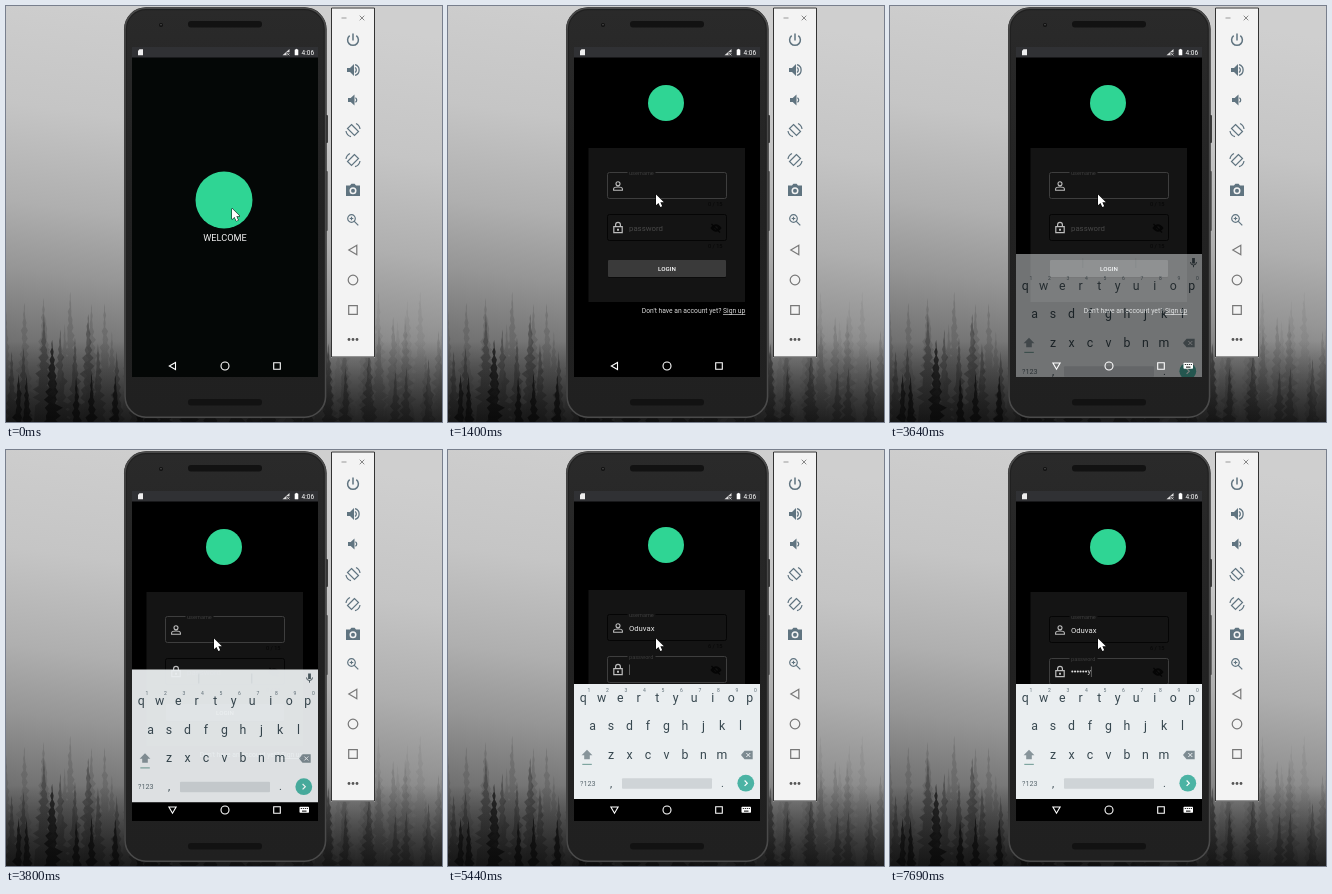
An HTML page with a canvas that plays this animation: 436 by 416 pixels, repeating every 8 s.

```html
<!DOCTYPE html>
<html lang="en">
<head>
<meta charset="utf-8">
<title>Login screen demo</title>
<style>
  html, body { margin: 0; width: 100%; height: 100%; overflow: hidden; background: #888; }
  canvas { display: block; width: 436px; height: 416px; }
</style>
</head>
<body>
<canvas id="stage"></canvas>
<script>
const W = 436, H = 416, LOOP = 8000, STEP = 77;
const dpr = window.devicePixelRatio || 1;
function prepare(canvas) {
  canvas.width = W * dpr;
  canvas.height = H * dpr;
  return canvas.getContext('2d');
}
const layer = prepare(document.createElement('canvas'));
let ctx = prepare(document.getElementById('stage'));

const USERNAME = 'Oduvax', PASSWORD = 'meadowy';
const userKeys = [4040, 4430, 4580, 4750, 4900, 5050];
const passKeys = [6440, 6610, 7080, 7150, 7320, 7460, 7690];
const caretBlinks = [1300, 1780, 2250, 2800, 3260, 4040, 5740, 6300];
const LOGIN_AT = 770, TAP_AT = 3410, KEYBOARD_AT = 3580, PASSWORD_AT = 5280;

// Drawing helpers
function box(x, y, w, h, fill, r = 0) {
  ctx.fillStyle = fill;
  ctx.beginPath();
  ctx.roundRect(x, y, w, h, r);
  ctx.fill();
}
function frame(x, y, w, h, color, width = 1, r = 0) {
  ctx.strokeStyle = color;
  ctx.lineWidth = width;
  ctx.beginPath();
  ctx.roundRect(x, y, w, h, r);
  ctx.stroke();
}
function disc(x, y, r, fill) {
  ctx.fillStyle = fill;
  ctx.beginPath();
  ctx.arc(x, y, r, 0, 7);
  ctx.fill();
}
function label(s, x, y, size, fill, align = 'left', weight = 400) {
  ctx.font = `${weight} ${size}px Roboto, sans-serif`;
  ctx.textAlign = align;
  ctx.fillStyle = fill;
  ctx.fillText(s, x, y);
}
function icon(x, y, color, outline, solid = '', width = 1.3) {
  ctx.save();
  ctx.translate(x, y);
  ctx.strokeStyle = ctx.fillStyle = color;
  ctx.lineWidth = width;
  if (outline) ctx.stroke(new Path2D(outline));
  if (solid) ctx.fill(new Path2D(solid), 'evenodd');
  ctx.restore();
}
function gradient(x0, y0, x1, y1, stops) {
  const g = ctx.createLinearGradient(x0, y0, x1, y1);
  stops.forEach(([at, color]) => g.addColorStop(at, color));
  return g;
}
const circlePath = r => `M${-r} 0a${r} ${r} 0 1 0 ${2 * r} 0a${r} ${r} 0 1 0 ${-2 * r} 0z`;

// Paints onto a separate layer, shifted down by dy, then fades it in as a whole
function group(alpha, dy, paint) {
  const outer = ctx;
  ctx = layer;
  ctx.setTransform(dpr, 0, 0, dpr, 0, 0);
  ctx.clearRect(0, 0, W, H);
  ctx.translate(0, dy);
  paint();
  ctx = outer;
  ctx.globalAlpha = alpha;
  ctx.drawImage(layer.canvas, 0, 0, W, H);
  ctx.globalAlpha = 1;
}

// Timing helpers
const clamp = v => Math.max(0, Math.min(1, v));
const snap = (t, anchor) => anchor + Math.floor((t - anchor) / STEP) * STEP;
const countUntil = (times, t) => times.filter(at => at <= t).length;

// Misty forest, thinning out into fog towards the right
let seed = 11;
function random() {
  seed = (seed * 16807) % 2147483647;
  return seed / 2147483647;
}
function treeLayer(count, top, spread, halfWidth) {
  const path = new Path2D();
  for (let i = 0; i < count; i++) {
    const x = (i + random()) * W / count, y = top + random() * spread;
    const right = [], left = [];
    for (let k = 0; k < 24; k++) {
      const w = halfWidth * (k / 24) * (k % 2 ? 1 : 0.5);
      right.push([x + w * (0.6 + random() * 0.8), y + k * 4]);
      left.unshift([x - w * (0.6 + random() * 0.8), y + k * 4]);
    }
    [...right, [x + halfWidth, H], [x - halfWidth, H], ...left]
      .forEach(([px, py], n) => n ? path.lineTo(px, py) : path.moveTo(px, py));
    path.closePath();
  }
  return path;
}
const forest = [
  [treeLayer(34, 285, 45, 9), 70, .28],
  [treeLayer(30, 305, 45, 10), 45, .45],
  [treeLayer(22, 322, 50, 11), 18, .75]
];
function backdrop() {
  box(0, 0, W, H, gradient(60, -20, 0, H, [
    [0, '#cfcfcf'], [.28, '#c5c5c5'], [.5, '#afafaf'], [.65, '#969696'],
    [.8, '#747474'], [1, '#4c4c4c']
  ]));
  forest.forEach(([path, tone, alpha]) => {
    const mist = a => `rgba(${tone},${tone},${tone},${a})`;
    ctx.fillStyle = gradient(90, 0, 390, 0, [[0, mist(alpha)], [1, mist(alpha * .35)]]);
    ctx.fill(path);
  });
  box(0, 335, W, 81, gradient(0, 335, 0, H, [[0, 'rgba(0,0,0,0)'], [1, 'rgba(0,0,0,.65)']]));
}

function phone() {
  box(319, 109, 3, 28, '#3a3a3a', 1);
  box(319, 165, 3, 60, '#666', 1);
  box(118, 1.2, 202.6, 411, '#202020', 22);
  frame(119, 2.2, 200.6, 409, '#4a4a4a', 1.6, 21);
  box(121, 4.2, 196.6, 405, gradient(0, 5, 0, 409, [[0, '#2a2a2a'], [.5, '#222222'], [1, '#202020']]), 19);
  box(182, 15, 74, 6.5, '#121212', 3);
  box(182, 393, 74, 6.5, '#121212', 3);
  disc(155, 19, 2, '#111');
  disc(155, 18.7, .8, '#555');
}

function sidebar() {
  box(325, 1.5, 44, 350, '#f3f3f3');
  frame(325.5, 2, 43, 349, '#333');
  const slate = '#607480', gray = '#777';
  icon(338, 12, '#999', 'M-2.5 0h5', '', 1);
  icon(356, 12, '#888', 'M-2.3-2.3l4.6 4.6M2.3-2.3l-4.6 4.6', '', 1);
  icon(347, 34, slate, 'M0-6.5v7M-3.3-4.3A5.4 5.4 0 1 0 3.3-4.3', '', 1.5);
  icon(347, 64, slate, 'M2-2.5a3 3 0 0 1 0 5M2-5.4a5.6 5.6 0 0 1 0 10.8', 'M-6-2h3l4-4v12l-4-4h-3z');
  icon(347, 94, slate, 'M2.4-2.3a2.7 2.7 0 0 1 0 4.6', 'M-5-2h2.7l3.8-3.6v11.2l-3.8-3.6h-2.7z');
  icon(347, 124, slate, 'M-1.5-5.5l7 7l-4 4l-7-7zM-7 1a7 7 0 0 0 5 5.7M7-1a7 7 0 0 0-4-5.5', '', 1.2);
  icon(347, 154, slate, 'M1.5-5.5l-7 7l4 4l7-7zM7 1a7 7 0 0 1-5 5.7M-7-1a7 7 0 0 1 4-5.5', '', 1.2);
  icon(347, 184, slate, '', 'M-7-4.5h4l1.4-1.7h3.2l1.4 1.7h4v10.5h-14z' +
    'M-3.5.8a3.5 3.5 0 1 0 7 0a3.5 3.5 0 1 0-7 0z');
  disc(347, 184.8, 2, slate);
  icon(345.5, 212.5, slate, circlePath(3.8) + 'M2.8 2.8l4 4M-1.8 0h3.6M0-1.8v3.6', '', 1.2);
  icon(347, 244, gray, 'M3.8-4.8v9.6l-8-4.8z', '', 1.2);
  icon(347, 274, gray, circlePath(4.8), '', 1.2);
  icon(347, 304, gray, 'M-4.3-4.3h8.6v8.6h-8.6z', '', 1.2);
  [-4, 0, 4].forEach(dx => disc(347 + dx, 333.5, 1.4, '#555'));
}

function statusBar() {
  box(126, 41, 186, 10.5, '#303134');
  icon(134.5, 46.2, '#eee', '', 'M-1-3h3.5v6h-5v-4.5z');
  icon(280, 46.3, '#ddd', 'M1.2.9l2.2 2.2M3.4.9l-2.2 2.2', 'M3.5-3.3v3.3h-3v3h-4z', .8);
  box(288.7, 43.6, 3.6, 5.6, '#fff', .5);
  box(289.7, 42.9, 1.6, 1, '#fff');
  label('4:06', 295.5, 48.6, 6.5, '#fff');
}

function navIcons(keyboardOpen) {
  icon(166.5, 360, '#fff', keyboardOpen ? 'M-3.6-3h7.2l-3.6 6.2z' : 'M3-3.6v7.2l-6.2-3.6z', '', 1.1);
  icon(219, 360, '#fff', circlePath(4), '', 1.1);
  icon(271, 360, '#fff', 'M-3.3-3.3h6.6v6.6h-6.6z', '', 1.1);
  if (!keyboardOpen) return;
  box(293.5, 356.8, 9.5, 6, '#fff', .7);
  [0, 1, 2, 3].forEach(i => box(294.8 + i * 2, 358, 1, 1, '#000'));
  box(296, 360.6, 4.5, 1, '#000');
}

function welcome() {
  box(126, 51, 186, 320, '#040706');
  disc(218, 194, 28.5, '#2fd594');
  label('WELCOME', 219, 235.2, 9.2, '#f2f2f2', 'center');
}

// Outlined text field; a floating label interrupts the top border
function field(y, name, active, floating) {
  frame(159.5, y, 119, 26, active ? '#3e3e3e' : '#050505', 1, 2);
  if (floating) {
    box(179.5, y - 1, 28, 2, '#141414');
    label(name, 181, y + 2.3, 5.6, '#3d3d3d');
  } else {
    label(name, 181, y + 16.3, 7.8, '#484848');
  }
}
function caret(x, y) {
  box(x, y, .8, 10.5, '#707070');
}

function login(t) {
  const onPassword = t >= PASSWORD_AT;
  const typedUser = countUntil(userKeys, t), typedPass = countUntil(passKeys, t);
  const caretOn = countUntil(caretBlinks, t) % 2 === 0;

  box(126, 41, 186, 10.5, '#303134');
  box(126, 51, 186, 323, '#000');
  disc(218, 97, 18, '#2fd594');
  box(140.5, 142, 156.5, 154, '#141414');

  field(166.5, 'username', !onPassword, true);
  icon(170, 180, '#bdbdbd', 'M-2-2.3a2 2 0 1 0 4 0a2 2 0 1 0-4 0zM-4.4 4.2v-1.2c0-2.6 8.8-2.6 8.8 0v1.2z', '', 1.1);
  const name = USERNAME.slice(0, typedUser);
  label(name, 181, 183.2, 7.7, '#e6e6e6');
  const nameWidth = ctx.measureText(name).width;
  if (name && !onPassword) box(181, 184.6, nameWidth, .7, '#ccc');
  if (!onPassword && caretOn) caret(181.2 + nameWidth, 175.5);
  label(`${typedUser} / 15`, 274.5, 200, 5.6, '#060606', 'right');

  field(208.5, 'password', onPassword, onPassword);
  icon(170, 222, '#bdbdbd', 'M-4.2-1.3h8.4v6h-8.4zM-2.4-1.3v-2a2.4 2.4 0 0 1 4.8 0v2', 'M-1 .8h2v2h-2z', 1.2);
  icon(268, 222, '#050505', 'M-4.5-4l8.5 8.5', 'M-5.5 0q5.5-7.5 11 0q-5.5 7.5-11 0z' + circlePath(1.8), 1.2);
  if (onPassword) {
    const hidden = Math.max(0, typedPass - 1), end = 181 + hidden * 2.75;
    for (let i = 0; i < hidden; i++) disc(182.3 + i * 2.75, 221.5, 1.05, '#ddd');
    const last = PASSWORD.slice(hidden, typedPass);
    label(last, end, 224.3, 7.2, '#e6e6e6');
    if (caretOn) caret(end + ctx.measureText(last).width, 216.5);
  }
  label(`${typedPass} / 15`, 274.5, 241.5, 5.6, '#060606', 'right');

  box(160, 254.5, 118, 17.5, '#0b0b0b', 1);
  box(160, 254, 118, 17, '#3a3a3a', 1);
  label('LOGIN', 219, 265.2, 6.2, '#fff', 'center', 500);
  label("Don't have an account yet? Sign up", 297.3, 307, 6.74, '#d8d8d8', 'right');
  box(275, 308.3, 22.3, .7, '#d8d8d8');
}

function keyRow(keys, x, y) {
  [...keys].forEach((key, i) => label(key, x + i * 18.5, y, 12.3, '#37474f', 'center'));
}
function keyboard(t) {
  const strip = t < PASSWORD_AT, top = strip ? 216 : 234;
  box(126, top, 186, 349 - top, '#eaeef0');
  box(126, 349, 186, 22, '#000');
  if (strip) {
    [192.5, 245.5].forEach(x => box(x, 220, .7, 10, '#d3d9dc'));
    icon(303.5, 224.5, '#4c5a61', 'M-3-.5a3 3 0 0 0 6 0M0 2.5v2.2', 'M-1.4-4.5h2.8v5.5h-2.8z', 1);
    if (t >= userKeys[2]) {
      label('Band', 166.5, 228.6, 7.8, '#68757c', 'center');
      label('And', 218.8, 228.6, 7.8, '#37474f', 'center', 700);
      label('Land', 271, 228.6, 7.8, '#68757c', 'center');
      [-2.4, 0, 2.4].forEach(dx => disc(218.8 + dx, 232.3, .8, '#37474f'));
    }
  }
  keyRow('qwertyuiop', 135.2, 252);
  [...'1234567890'].forEach((n, i) => label(n, 141 + i * 18.5, 242, 5, '#607078', 'center'));
  keyRow('asdfghjkl', 144.5, 280.4);
  keyRow('zxcvbnm', 163, 308.8);
  icon(139, 305, '#87949a', '', 'M0-5.2l5.4 5.4h-2.6v4h-5.6v-4h-2.6z');
  box(134.3, 313.8, 9.5, 1.2, '#7fa5a0');
  icon(299, 305, '#7d8b92', '', 'M-6 0l3.5-4.2h8.2v8.4h-8.2z');
  icon(300.3, 305, '#eaeef0', 'M-2-2l4 4M2-2l-4 4', '', 1);
  label('?123', 139.8, 335.8, 7.2, '#5c6a71', 'center');
  label(',', 163, 336.5, 11, '#37474f', 'center');
  box(174, 328.3, 90, 10.5, '#cfd4d7', 1);
  label('.', 274.5, 336.5, 11, '#37474f', 'center');
  disc(297.8, 333.2, 8.4, '#4bb3a4');
  icon(297.8, 333.2, '#fff', 'M-1.2-2.7l2.7 2.7l-2.7 2.7', '', 1.2);
}

function pointerAt(t) {
  if (t < 70) return [226, 202.5];
  const glide = (start, [x0, y0], [x1, y1]) => {
    const u = clamp((snap(t, start) - start + STEP) / (4 * STEP));
    return [x0 + (x1 - x0) * u, y0 + (y1 - y0) * u];
  };
  return t < 1170 ? glide(300, [223.5, 203], [195.5, 211]) : glide(1170, [195.5, 211], [208, 188.5]);
}
function pointer(t) {
  const [x, y] = pointerAt(t);
  const arrow = 'M0 0v10.8l2.5-2.3l1.8 4l1.9-.8l-1.8-4h3.5z';
  icon(x, y, '#000', arrow, '', 1);
  icon(x, y, '#fff', '', arrow);
}

function screen(t) {
  ctx.save();
  ctx.beginPath();
  ctx.rect(126, 41, 186, 330);
  ctx.clip();
  welcome();
  if (t >= LOGIN_AT) {
    const enter = clamp((snap(t, 850) - 696) / 308);
    const pan = -2 * Math.sin(Math.PI * clamp((snap(t, 5440) - PASSWORD_AT) / 320));
    group(Math.min(1, enter * 1.9), 12 * (1 - enter) ** 2 + pan, () => login(t));
  }
  statusBar();
  if (t >= TAP_AT && t < KEYBOARD_AT) disc(207.5, 187.5, 8, 'rgba(255,255,255,.1)');
  const open = t >= KEYBOARD_AT;
  if (open) {
    const rest = 1 - clamp((snap(t, 3640) - 3550) / 320);
    group(1 - rest ** 2, 62 * rest ** 2, () => keyboard(t));
  }
  navIcons(open);
  ctx.restore();
}

const started = performance.now();
function draw() {
  const t = (performance.now() - started) % LOOP;
  ctx.setTransform(dpr, 0, 0, dpr, 0, 0);
  backdrop();
  phone();
  sidebar();
  screen(t);
  pointer(t);
  requestAnimationFrame(draw);
}
draw();
</script>
</body>
</html>
```
